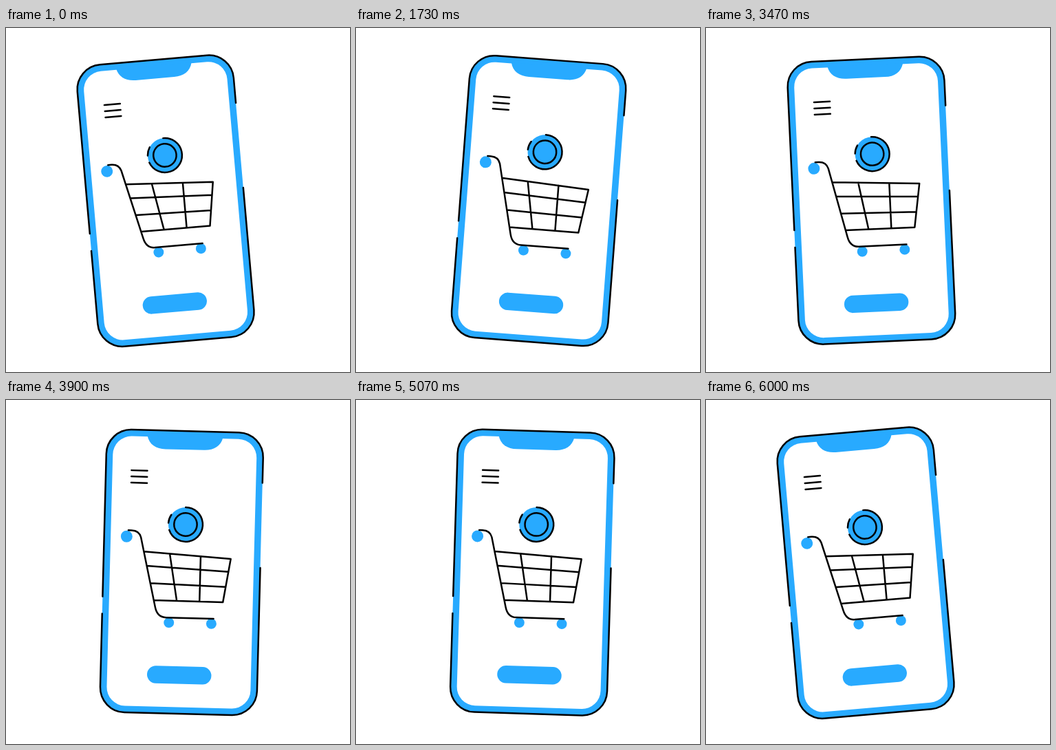
Recreate the animation shown at these times as an HTML page. Size 500 by 500 pixels, loop 6.03 s.

```html
<!DOCTYPE html>
<html lang="en">
<head>
<meta charset="utf-8">
<title>Mobile shopping</title>
<style>
  html, body { margin: 0; width: 100%; height: 100%; overflow: hidden; background: #fff; }
  svg { display: block; width: 100vw; height: 100vh; }
  .fill { fill: #28aaff; }
  .line { fill: none; stroke: #000; stroke-width: 2.5; stroke-linecap: round; stroke-linejoin: round; }
</style>
</head>
<body>
<svg viewBox="0 0 500 500">
  <g id="phone">
    <rect class="fill" x="136" y="45" width="228" height="411" rx="36"/>
    <rect fill="#fff" x="145.5" y="54.5" width="209" height="392" rx="27"/>
    <path class="fill" d="M195 53C198 66 208 72 222 72H278C292 72 302 66 305 53Z"/>
    <path class="line" d="M136 288.5V81A36 36 0 0 1 172 45H328A36 36 0 0 1 364 81V117.5
      M364 241V420A36 36 0 0 1 328 456H172A36 36 0 0 1 136 420V313.5"/>

    <path class="line" d="M173.3 104h23M173.3 113h23M173.3 122h23"/>
    <rect class="fill" x="203.5" y="387" width="93.5" height="25.5" rx="12.75"/>

    <g id="coin">
      <circle class="fill" r="25"/>
      <circle class="line" r="16.7"/>
      <path class="line" id="rim"/>
    </g>

    <circle class="fill" cx="168.7" cy="200.3" r="8.5"/>
    <circle class="fill" cx="233.3" cy="324" r="7.5"/>
    <circle class="fill" cx="295" cy="324" r="7.5"/>
    <path class="line" d="M171 191.3H176C183 191.3 187.5 194.5 189.5 201L212.8 302C215 312 220 316.7 229 316.7H298
      M194.8 221.5L320.8 229L311 292.3L210.7 292
      M199 242.3L318 248M205.5 267.4L314.5 270
      M232 223.8L243.9 292M277 226.4V292"/>
  </g>
</svg>
<script>
  const LOOP = 6030, SWING = 1500, TILT = 5;
  const phone = document.getElementById('phone');
  const coin = document.getElementById('coin');

  const onRim = deg => {
    const a = deg * Math.PI / 180;
    return `${25 * Math.cos(a)} ${25 * Math.sin(a)}`;
  };
  const arc = (from, to) =>
    `M${onRim(from)}A25 25 0 ${to - from > 180 ? 1 : 0} 1 ${onRim(to)}`;
  document.getElementById('rim').setAttribute('d', arc(-91, 160) + arc(184, 213));

  const ease = s => s * s * (3 - 2 * s);

  function draw(now) {
    const t = Math.min(now % LOOP, 4 * SWING) / SWING;
    const s = ease(t % 1);
    const angle = TILT * (2 * (Math.floor(t) % 2 ? 1 - s : s) - 1);
    phone.setAttribute('transform', `rotate(${angle} 250 456)`);
    // The coin floats slightly against the tilt.
    coin.setAttribute('transform', `translate(${254 - 0.12 * angle} ${181.6 - 0.55 * angle})`);
    requestAnimationFrame(() => draw(performance.now() - start));
  }

  const start = performance.now();
  draw(0);
</script>
</body>
</html>
```
